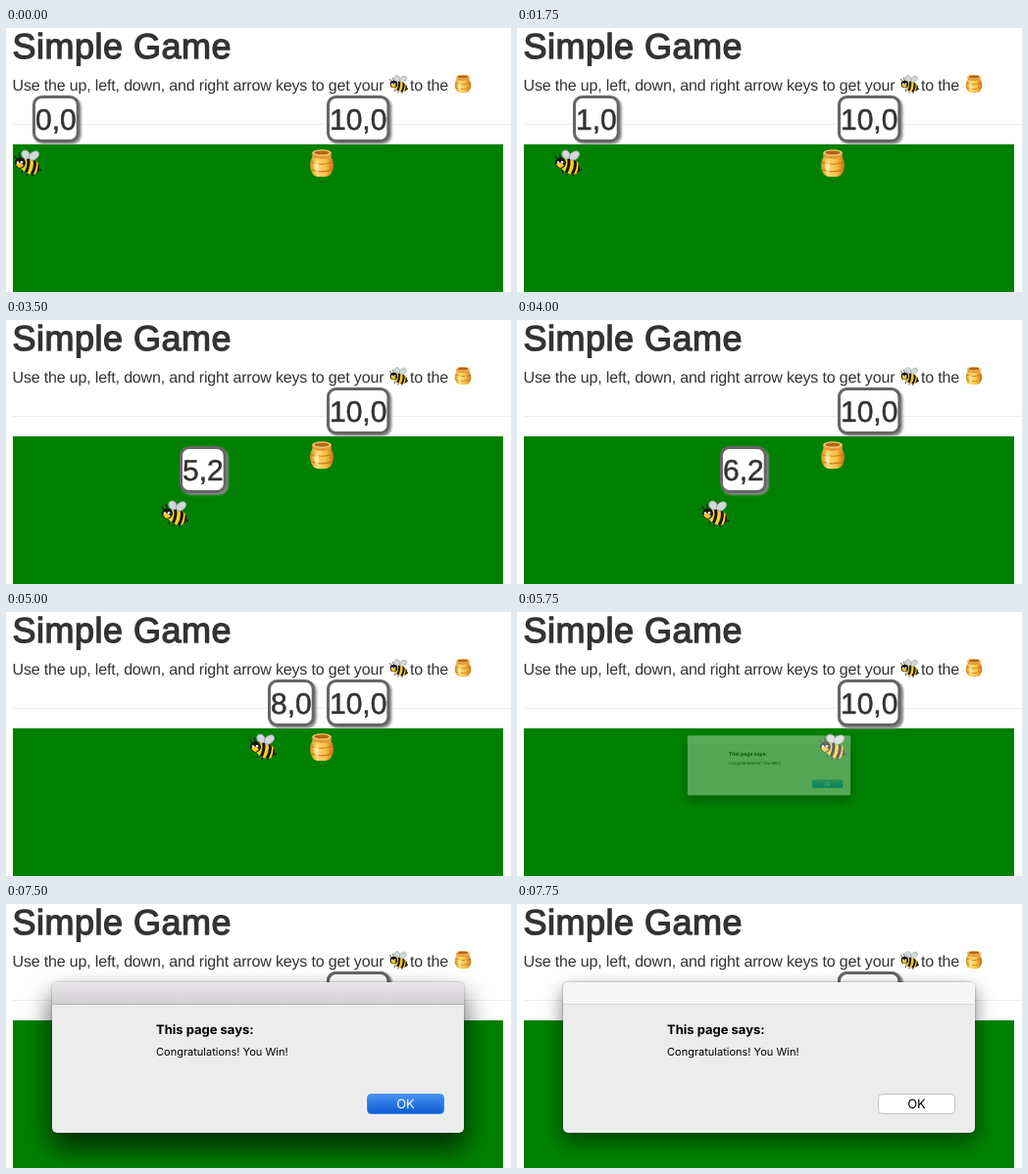
Animation, 515 px wide and 270 px high, one loop 8000 ms. Source, as an HTML page:

```html
<!DOCTYPE html>
<html lang="en">
<head>
<meta charset="utf-8">
<title>Simple Game</title>
<style>
  html, body { margin: 0; width: 100%; height: 100%; overflow: hidden; background: #fff; }
  svg { display: block; }
  text { font-family: "Liberation Sans", Arial, sans-serif; fill: #333; text-rendering: geometricPrecision; }
  .title { font-size: 36px; letter-spacing: .5px; stroke: #333; stroke-width: 1.3; }
  .intro { font-size: 16px; letter-spacing: -.16px; }
  .label { filter: drop-shadow(2.5px 2.5px 1px #8a8a8a); }
  .label rect { fill: #fff; stroke: #666; stroke-width: 3; }
  .label text { font-size: 30px; stroke: #333; stroke-width: .5; }
  #dialog text { font-family: Inter, "Open Sans", sans-serif; fill: #000; }
</style>
</head>
<body>
<svg id="stage" width="515" height="270" viewBox="0 0 515 270">
  <defs>
    <linearGradient id="activeBar" x2="0" y2="1"><stop stop-color="#e9e7e9"/><stop offset="1" stop-color="#d1cfd1"/></linearGradient>
    <linearGradient id="blue" x2="0" y2="1"><stop stop-color="#6cb5fa"/><stop offset="1" stop-color="#157cf9"/></linearGradient>
    <linearGradient id="pressedBlue" x2="0" y2="1"><stop stop-color="#4b92f3"/><stop offset="1" stop-color="#0a5ccf"/></linearGradient>
    <linearGradient id="gold" x2="1" y2="0"><stop stop-color="#d98a1c"/><stop offset=".3" stop-color="#ffdc70"/><stop offset=".65" stop-color="#fbc04a"/><stop offset="1" stop-color="#c87412"/></linearGradient>
    <clipPath id="beeBody"><ellipse cx="16.5" cy="17.5" rx="10.5" ry="7.6" transform="rotate(24 16.5 17.5)"/></clipPath>

    <symbol id="bee" viewBox="0 0 28 28">
      <path d="M24 19l4 2-4 2zM9 21l-1 4M14 24l-1 3M19 25v3" fill="#222" stroke="#222" stroke-width="1.2"/>
      <g clip-path="url(#beeBody)">
        <path d="M3 5h25v23H3z" fill="#f9d02c"/>
        <path d="M14 8q3 8-3 18M20.500 9q3 9-3 18M26 12q1 8-3 16" fill="none" stroke="#17140d" stroke-width="3"/>
      </g>
      <g fill="#d3d9d8" stroke="#8b9695" stroke-width=".7">
        <ellipse cx="12" cy="5.500" rx="4" ry="4.800" transform="rotate(-35 12 5.500)"/>
        <ellipse cx="20.500" cy="6.500" rx="4" ry="5.800" transform="rotate(52 20.500 6.500)"/>
      </g>
      <path d="M4 10Q1 9 1 6M7 9Q5 7 5.500 4" fill="none" stroke="#222" stroke-width="1.1"/>
      <circle cx="6.500" cy="14" r="5.500" fill="#191710"/>
      <path d="M2 15.500q4-4 8 1q-3 4-6 1.500z" fill="#f5c91f"/>
      <circle cx="4" cy="13.500" r="1.200" fill="#fff"/><circle cx="8" cy="13.300" r="1.300" fill="#fff"/>
    </symbol>

    <symbol id="honey" viewBox="0 0 28 28" preserveAspectRatio="none">
      <path d="M6 5Q-2 14 3 23Q5 28 14 28T25 23Q30 14 22 5z" fill="url(#gold)"/>
      <path d="M1.500 13q12.500 4 25 0M2.500 20.500q11.500 4 23 0" fill="none" stroke="#c67a1b" stroke-width="1.1"/>
      <path d="M6 13q-1 5 1 10h4q-1-5 0-9z" fill="#fff3b4" opacity=".65"/>
      <path d="M3.500 3.500v4q10.500 4.500 21 0v-4z" fill="#e39a34"/>
      <ellipse cx="14" cy="3.500" rx="10.500" ry="3.300" fill="#f4c878"/>
      <ellipse cx="14" cy="3.500" rx="8.300" ry="2" fill="#b5650f"/>
    </symbol>
  </defs>

  <rect width="515" height="270" fill="#fff"/>
  <text class="title" x="6.5" y="31">Simple Game</text>
  <text class="intro" x="6.5" y="64">Use the up, left, down, and right arrow keys to get your</text>
  <text class="intro" x="412" y="64">to the</text>
  <use href="#bee" x="391" y="48" width="19" height="19"/>
  <use href="#honey" x="457" y="47.5" width="18" height="19"/>
  <path d="M7 98.5H515" stroke="#eee"/>
  <path d="M7 119H507V270H7z" fill="#008000"/>

  <use id="goal" href="#honey" x="309" y="124" width="26" height="28.5"/>
  <g class="label" transform="translate(327 69)"><rect/><text>10,0</text></g>
  <g id="player">
    <use href="#bee" x="8" y="124" width="28" height="28"/>
    <g class="label" transform="translate(27 69)"><rect/><text>0,0</text></g>
  </g>

  <g id="dialog">
    <rect id="panel" x="47" y="80" width="420" height="154" rx="5" fill="#ececec"/>
    <path id="bar" d="M47 102.5V85q0-5 5-5H462q5 0 5 5v17.5z"/>
    <path id="barLine" d="M47 102.5H467"/>
    <text x="153" y="133" font-size="13" font-weight="700">This page says:</text>
    <text x="153" y="155" font-size="11">Congratulations! You Win!</text>
    <rect id="button" x="368.5" y="194.5" width="78" height="20" rx="4"/>
    <text id="ok" x="407.5" y="209.3" font-size="13" text-anchor="middle">OK</text>
  </g>
</svg>
<script>
const $ = id => document.getElementById(id);
const LOOP = 8000, CELL = 30;

// [start ms, column, row]
const moves = [
  [0, 0, 0], [1750, 1, 0], [2000, 2, 0], [2250, 3, 0], [2500, 4, 0], [2750, 4, 1],
  [3250, 5, 1], [3500, 5, 2], [4000, 6, 2], [4250, 8, 2], [4750, 8, 1],
  [5000, 8, 0], [5500, 9, 0], [5750, 10, 0]
];
const OPENING = 5750, OPEN = 6000, PRESSED = 7500, INACTIVE = 7750;

function setLabel(label, value) {
  const [box, text] = label.children;
  const digits = value.length - 1;
  const attrs = { x: 1.5, y: 1.5, width: digits * 16.68 + 11.34, height: 45, rx: 8 };
  for (const name in attrs) box.setAttribute(name, attrs[name]);
  text.setAttribute("x", 3);
  text.setAttribute("y", 35);
  text.textContent = value;
}

function paint(id, fill, stroke) {
  $(id).style.fill = fill;
  $(id).style.stroke = stroke;
}

function drawDialog(t) {
  const dialog = $("dialog"), opening = t < OPEN, inactive = t >= INACTIVE;
  const paleBar = opening || inactive;
  dialog.style.display = t < OPENING ? "none" : "";
  dialog.setAttribute("opacity", opening ? .36 : 1);
  dialog.setAttribute("transform", opening ? "translate(257 157) scale(.396) translate(-257 -157)" : "");
  $("panel").style.filter = inactive
    ? "drop-shadow(0 8px 10px rgba(0,0,0,.38)) drop-shadow(0 0 1px rgba(0,0,0,.4))"
    : "drop-shadow(0 15px 14px rgba(0,0,0,.55)) drop-shadow(0 0 1px rgba(0,0,0,.4))";
  paint("bar", paleBar ? "#f6f6f6" : "url(#activeBar)", "none");
  paint("barLine", "none", paleBar ? "#d3d3d3" : "#b4b2b4");
  if (inactive) paint("button", "#fff", "#c3c3c3");
  else paint("button", t < PRESSED ? "url(#blue)" : "url(#pressedBlue)", "#3b8df0");
  $("ok").style.fill = inactive ? "#000" : "#fff";
}

function draw(t) {
  const [, col, row] = moves.findLast(([start]) => start <= t);
  const player = $("player");
  player.setAttribute("transform", `translate(${col * CELL} ${row * CELL})`);
  setLabel(player.querySelector(".label"), `${col},${row}`);
  $("goal").style.display = col === 10 ? "none" : "";
  drawDialog(t);
}

document.querySelectorAll(".label").forEach(label => setLabel(label, label.textContent));

const begin = performance.now();
function tick() {
  draw((performance.now() - begin) % LOOP);
  requestAnimationFrame(tick);
}
tick();
</script>
</body>
</html>
```
